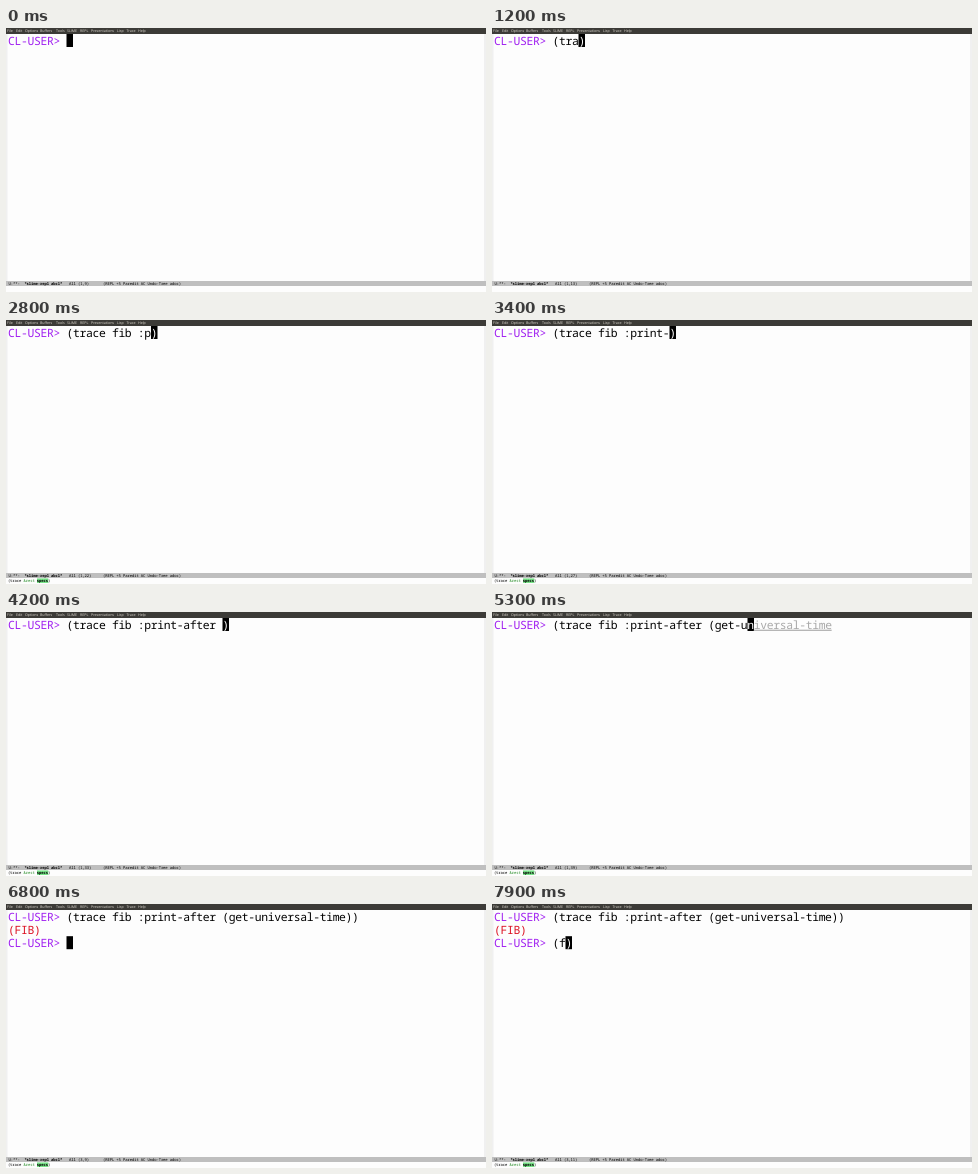
Recreate the animation shown at these times as an HTML page. Size 480 by 264 pixels, loop 8 s.

```html
<!DOCTYPE html>
<html lang="en">
<head>
<meta charset="utf-8">
<title>REPL session</title>
<style>
  html, body { margin: 0; width: 100%; height: 100%; overflow: hidden; background: #fdfdfd; }
  svg { display: block; width: 480px; height: 264px; }
  text { white-space: pre; text-rendering: geometricPrecision; }
  .mono { font-family: "Noto Sans Mono", "DejaVu Sans Mono", monospace; letter-spacing: -.03em; }
  .big { font-size: 11.4px; }
  .small { font-size: 3.91px; }
  .menu { font: 3.6px "Open Sans", "Noto Sans", sans-serif; fill: #dfdbd2; }
  .prompt { fill: #a020f0; }
  .result { fill: #dc1424; }
  .hint { fill: #a9a9a9; text-decoration: underline; }
  .under { fill: #fff; }
  .rest { fill: #228b22; }
  .bold { font-weight: bold; }
</style>
</head>
<body>
<svg viewBox="0 0 480 264">
  <rect width="480" height="264" fill="#fdfdfd"/>
  <path d="M0 6h1.5v247h-1.5zM478 6h2v247h-2z" fill="#f0f0f0"/>
  <rect width="480" height="6" fill="#3c3b37"/>
  <g class="menu" id="menu"></g>

  <rect id="cursor" width="6.5" height="13"/>
  <g class="mono big" id="lines"></g>

  <rect y="253" width="480" height="5" fill="#bfbfbf"/>
  <g class="mono small">
    <text x="2.6" y="256.8">U:**-</text>
    <text x="18.4" y="256.8" class="bold">*slime-repl abcl*</text>
    <text x="63" y="256.8" id="place"></text>
    <text x="97" y="256.8">(REPL +5 Paredit AC Undo-Tree adoc)</text>
    <g id="doc">
      <rect x="31" y="258.4" width="11.3" height="4.6" fill="#7ae68a"/>
      <text x="1.9" y="261.8">(trace <tspan class="rest">&amp;rest</tspan> <tspan class="bold">specs</tspan>)</text>
    </g>
  </g>
</svg>
<script>
const LOOP = 8000, COL = 6.5, ROW = 13.1, LEFT = 2, TOP = 6;
const PROMPT = "CL-USER> ";
const CALL = "(trace fib :print-after (get-universal-time))";
const NAME = "(get-universal-time";
const COMPLETE = 5700, ENTER = 6300, DOC = 1800, HINT = 5300;
const el = id => document.getElementById(id);

const menu = { File: 1, Edit: 10, Options: 19, Buffers: 34, Tools: 50, SLIME: 61, REPL: 74,
  Presentations: 85, Lisp: 111, Trace: 120.5, Help: 132 };
el("menu").innerHTML = Object.entries(menu)
  .map(([word, x]) => `<text x="${x}" y="4.3">${word}</text>`).join("");

// moment of each key press, in ms
const firstKeys = [
  500, 800, 1000, 1200, 1300, 1500, 1700, 1900, 2100,
  2200, 2400, 2600, 2800, 2900, 3000, 3200, 3300, 3400,
  3500, 3600, 3800, 3900, 4000, 4200,
  4500, 4700, 4800, 4900, 5100, 5300, 5500
];
const nextKeys = [7300, 7700];

const typed = (text, keys, t) => text.slice(0, keys.filter(k => k <= t).length);
const count = (s, c) => s.split(c).length - 1;
const closers = s => ")".repeat(count(s, "(") - count(s, ")"));
const span = (cls, s) => `<tspan class="${cls}">${s}</tspan>`;
const prompt = span("prompt", PROMPT.replace(">", "&gt;"));

function state(t) {
  if (t >= ENTER) {
    const head = typed("(f", nextKeys, t);
    return { done: true, head, tail: closers(head) };
  }
  if (t >= COMPLETE) {
    const head = CALL.slice(0, -2);
    return { head, tail: closers(head) };
  }
  const head = typed(CALL, firstKeys, t);
  if (t < HINT) return { head, tail: closers(head) };
  const word = head.slice(head.lastIndexOf("("));
  return { head, tail: NAME.slice(word.length), hint: true };
}

function line(row, html) {
  return `<text x="${LEFT}" y="${(TOP + 10.7 + row * ROW).toFixed(2)}">${html}</text>`;
}

let shown = "";
function draw() {
  const t = performance.now() % LOOP;
  const { done, head, tail, hint } = state(t);
  const row = done ? 2 : 0, col = PROMPT.length + head.length;
  const rest = tail.slice(1);
  let html = done ? line(0, prompt + CALL) + line(1, span("result", "(FIB)")) : "";
  html += line(row, prompt + head + span("under", tail.slice(0, 1)) + (hint ? span("hint", rest) : rest));
  if (html !== shown) {
    shown = html;
    el("lines").innerHTML = html;
    el("cursor").setAttribute("x", LEFT + col * COL);
    el("cursor").setAttribute("y", TOP + row * ROW);
    el("place").textContent = `All (${row + 1},${col})`;
  }
  el("doc").style.display = t < DOC ? "none" : "";
  requestAnimationFrame(draw);
}
draw();
</script>
</body>
</html>
```
